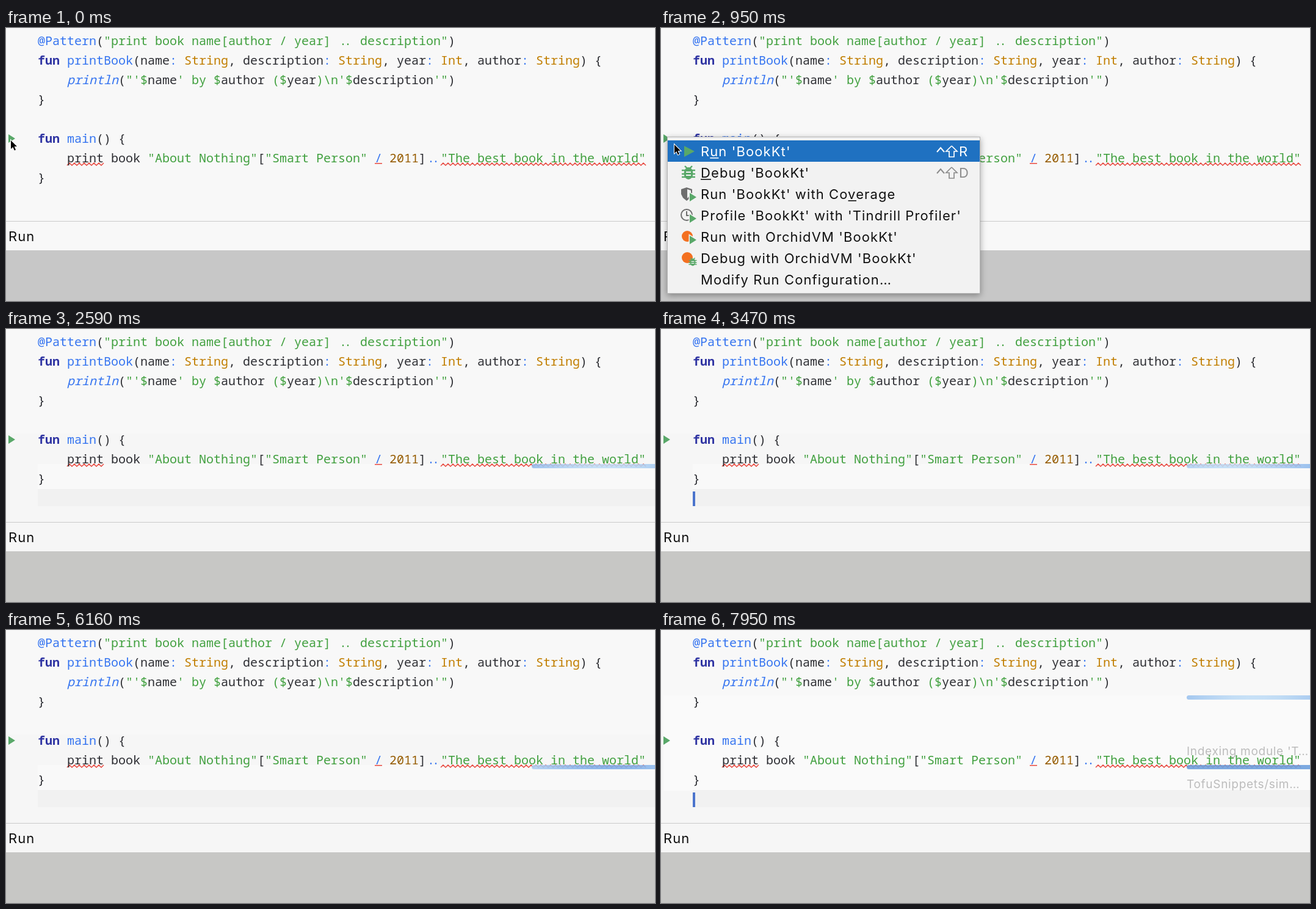
These frames come from a looping animation (1063x447 px, 8000 ms). An HTML page with a canvas:

```html
<!DOCTYPE html>
<html lang="en">
<head>
<meta charset="utf-8">
<title>Run menu</title>
<style>
html, body { margin: 0; width: 100%; height: 100%; overflow: hidden; background: #f8f8f8; }
canvas { display: block; }
</style>
</head>
<body>
<canvas id="stage" width="1063" height="447"></canvas>
<script>
const ctx = document.getElementById('stage').getContext('2d');
const LOOP = 8000, STEP = 148.9, CELL = 12;
const MENU_OPEN = 500, MENU_CLOSE = 1250, BAR_START = 1550, STATUS_START = 7500;
const MONO = '"Noto Sans Mono", "DejaVu Sans Mono", monospace';
const SANS = 'Inter, Roboto, sans-serif';
const GREEN = '#59a869', RED = '#e8483f', GREY = '#6e6e6e', ORANGE = '#f37021';

// Each piece starts with a style letter; pieces are parted by bars.
const INK = {
  b: '#3574f0', i: '#3574f0', d: '#2d2e33', g: '#41a03f',
  t: '#c17e00', k: '#3035a3', n: '#965c00'
};
const CODE = [
  [0, 0, 'b@Pattern|d(|g"print book name[author / year] |g..|g description"|d)'],
  [1, 0, 'kfun|d |bprintBook|d(name|b:|d |tString|d, description|b:|d |tString' +
         '|d, year|b:|d |tInt|d, author|b:|d |tString|d) {'],
  [2, 4, 'iprintln|d(|g"\'$|dname|g\' by $|dauthor|g ($|dyear|g)\\n\'$|ddescription|g\'"|d)'],
  [3, 0, 'd}'],
  [5, 0, 'kfun|d |bmain|d() {'],
  [6, 4, 'dprint book |g"About Nothing"|d[|g"Smart Person"|d |b/|d |n2011|d]|b..' +
         '|g"The best book in the world"'],
  [7, 0, 'd}']
];
// An ampersand marks the underlined letter.
const MENU = [
  "R&un 'BookKt'", "&Debug 'BookKt'", "Run 'BookKt' with Co&verage",
  "Profile 'BookKt' with 'Tindrill Profiler'", "Run with OrchidVM 'BookKt'",
  "Debug with OrchidVM 'BookKt'", 'Modify Run Configuration…'
];

function rect(x, y, w, h, color) {
  ctx.fillStyle = color;
  ctx.fillRect(x, y, w, h);
}

function poly(points, fill, stroke, width = 1) {
  ctx.beginPath();
  for (let i = 0; i < points.length; i += 2) ctx.lineTo(points[i], points[i + 1]);
  if (fill) {
    ctx.closePath();
    ctx.fillStyle = fill;
    ctx.fill();
  }
  if (stroke) {
    ctx.strokeStyle = stroke;
    ctx.lineWidth = width;
    ctx.stroke();
  }
}

function circle(x, y, r, fill, stroke) {
  ctx.beginPath();
  ctx.arc(x, y, r, 0, 7);
  ctx.lineWidth = 2;
  ctx.fillStyle = fill;
  ctx.strokeStyle = stroke;
  if (fill) ctx.fill();
  if (stroke) ctx.stroke();
}

function play(x, y, w, h, halo) {
  poly([x, y - h / 2, x + w, y, x, y + h / 2, x, y - h / 2], GREEN, halo, 3);
  if (halo) poly([x, y - h / 2, x + w, y, x, y + h / 2], GREEN);
}

function label(text, x, y, color, size = 22, gap = 1.1) {
  ctx.font = `${size}px ${SANS}`;
  ctx.letterSpacing = gap + 'px';
  ctx.fillStyle = color;
  ctx.fillText(text, x, y);
}

function codeLine([row, indent, line]) {
  let x = 52 + indent * CELL;
  const y = 28 + row * 32;
  ctx.letterSpacing = '0px';
  for (const piece of line.split('|')) {
    const style = piece[0], text = piece.slice(1);
    const face = style === 'k' ? 'bold ' : style === 'i' ? 'italic ' : '';
    ctx.font = `${face}20px ${MONO}`;
    ctx.fillStyle = INK[style];
    if (text === '..') {
      ctx.fillText('.', x + 2, y);
      ctx.fillText('.', x + CELL - 2, y);
    } else {
      ctx.fillText(text, x, y);
    }
    x += text.length * CELL;
  }
}

function wave(from, to) {
  const points = [];
  for (let x = from; x <= to; x += 4) points.push(x, points.length % 4 ? 221 : 225);
  poly(points, null, RED, 1.5);
}

function mix(a, b, p) {
  return `rgb(${a.map((v, i) => Math.round(v + (b[i] - v) * p))})`;
}

// Cyclic two-tone gradient drifting left.
function bar(y, light) {
  const fill = ctx.createLinearGradient(861, 0, 1063, 0);
  for (let i = 0; i <= 8; i++) {
    const x = 861 + i * 25.25;
    const p = 0.5 + 0.5 * Math.cos((x - light) * Math.PI / 200);
    fill.addColorStop(i / 8, mix([124, 172, 232], [192, 221, 246], p));
  }
  roundBar(y, fill);
}

function roundBar(y, fill) {
  ctx.beginPath();
  ctx.roundRect(861, y, 220, 7, 3.5);
  ctx.fillStyle = fill;
  ctx.globalAlpha = 0.88;
  ctx.fill();
  ctx.globalAlpha = 1;
}

function pointer(x, y) {
  const shape = [0, 0, 0, 14, 3.3, 11, 5.8, 16.5, 8, 15.5, 5.6, 10, 10, 10, 0, 0];
  const points = shape.map((v, i) => v + (i % 2 ? y : x));
  poly(points, '#000', '#fff', 2);
  poly(points, '#000');
}

function bug(x, y, s) {
  ctx.save();
  ctx.translate(x, y);
  ctx.scale(s, s);
  for (const side of [-1, 1]) {
    for (const leg of [-4, 2, 7]) poly([0, leg, side * 11, leg], null, GREEN, 2.4);
    poly([side * 2, -7, side * 6, -11], null, GREEN, 2.4);
  }
  ctx.beginPath();
  ctx.ellipse(0, 1, 7.5, 10, 0, 0, 7);
  ctx.fillStyle = GREEN;
  ctx.fill();
  rect(-4, -2, 8, 2, '#f2f2f2');
  rect(-4, 3, 8, 2, '#f2f2f2');
  ctx.restore();
}

function shortcut(letter, y, color) {
  poly([452, y + 1, 458, y - 6, 464, y + 1], null, color, 2);
  poly([476, y - 9, 485, y, 480, y, 480, y + 9, 472, y + 9, 472, y, 467, y, 476, y - 9],
    null, color, 1.7);
  label(letter, 488, y + 8, color);
}

function icons() {
  play(38, 202, 17, 18);
  bug(45, 237, 1);
  poly([33, 264, 42, 261, 51, 264, 51, 272, 48, 278, 42, 283, 36, 278, 33, 272], GREY);
  poly([43, 264, 49, 266, 49, 272, 43, 279], '#f2f2f2');
  circle(42, 306, 9, null, GREY);
  poly([42, 300, 42, 307, 47, 307], null, GREY, 2);
  circle(43, 341, 9, ORANGE);
  circle(43, 376, 9, ORANGE);
  for (const y of [277, 312, 347]) play(47, y, 11, 14, '#f2f2f2');
  bug(52, 383, 0.6);
}

function menu(selected) {
  ctx.save();
  ctx.shadowColor = 'rgba(0,0,0,.35)';
  ctx.shadowBlur = 10;
  ctx.shadowOffsetY = 3;
  rect(10, 178, 513, 257, '#b5b5b5');
  ctx.restore();
  rect(11, 179, 511, 255, '#f2f2f2');
  if (selected) rect(11, 184, 511, 35, '#1f71c1');
  MENU.forEach((item, i) => {
    const y = 210 + i * 35, color = selected && !i ? '#fff' : '#111';
    const [before, after] = item.includes('&') ? item.split('&') : [item, ''];
    label(before + after, 65, y, color);
    if (after) {
      const x = 65 + ctx.measureText(before).width;
      rect(x, y + 2, ctx.measureText(after[0]).width, 1.6, color);
    }
  });
  shortcut('R', 202, selected ? '#fff' : '#8c8c8c');
  shortcut('D', 237, '#8c8c8c');
  icons();
}

function draw(t) {
  const running = t >= MENU_CLOSE;
  const tick = MENU_CLOSE + Math.floor((t - MENU_CLOSE + 16) / STEP) * STEP;
  const status = t >= STATUS_START;

  rect(0, 0, 1063, 447, '#f8f8f8');
  if (running) {
    rect(0, 171, 1063, 193, '#f6f6f6');
    rect(52, 221, 1011, 41, '#f9f9f9');
    if (status) rect(4, 107, 1059, 156, '#fafafa');
    rect(52, 262, 1011, 28, '#f1f1f1');
    if ((tick + 120) % 1080 < 540) rect(52, 266, 4, 24, '#4b74cc');
  }
  rect(0, 316, 1063, 1, '#cacaca');
  rect(0, 364, 1063, 83, running ? '#c7c7c5' : '#c7c7c7');
  label('Run', 4, 349, '#111');
  play(4, 181, 11, 14);

  wave(100, 160);
  wave(712, 1048);
  rect(604, 221, 12, 1.5, RED);
  const light = 1075 - (tick % 800) / 2;
  if (status) {
    bar(107, 970 + (7950 - tick) / 2);
    roundBar(221, '#6c9fdd');
    label("Indexing module 'T…", 861, 205, '#bcbcbc', 19, 0.7);
    label('TofuSnippets/sim…', 861, 259, '#bcbcbc', 19, 0.7);
  } else if (t >= BAR_START) {
    bar(221, light);
  }
  CODE.forEach(codeLine);

  if (t < MENU_OPEN) {
    pointer(8, 184);
  } else if (!running) {
    const p = Math.min(1, Math.floor((t - MENU_OPEN) / 150) / 3);
    menu(p > 0);
    pointer(8 + 14 * p, 184 + 7 * p);
  }
}

function frame(now) {
  draw(now % LOOP);
  requestAnimationFrame(frame);
}
draw(0);
requestAnimationFrame(frame);
</script>
</body>
</html>
```
